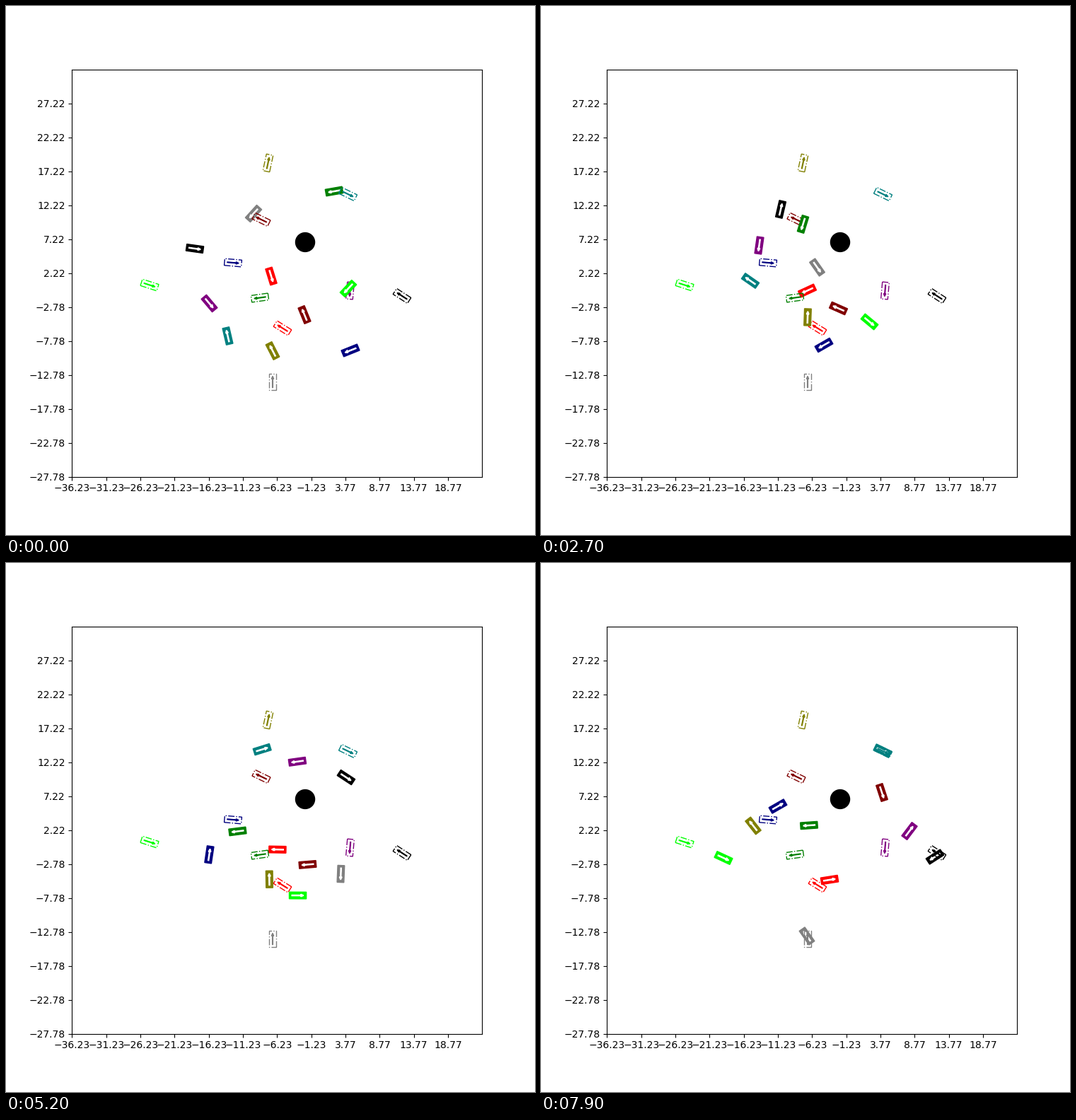
Animation of 748 by 748 pixels, one loop 8 s. Source, as a matplotlib script:

```python
import numpy as np
import matplotlib.pyplot as plt
from matplotlib.animation import FuncAnimation
from matplotlib.patches import Circle, FancyArrow, Rectangle
from matplotlib.transforms import Affine2D

SIZE, DPI = 748, 100
FRAMES, INTERVAL = 80, 100
X0, Y0, SPAN = -36.23, -27.78, 60
LENGTH, WIDTH = 2.5, 1.0
LEFT, RIGHT, BOTTOM, TOP = 0.1249, 0.9, 0.11, 0.88
STEPS = [0, 26, 43, 58, 78]

fig, ax = plt.subplots(figsize=(SIZE / DPI, SIZE / DPI), dpi=DPI)
fig.subplots_adjust(LEFT, BOTTOM, RIGHT, TOP)
ax.set_xlim(X0, X0 + SPAN)
ax.set_ylim(Y0, Y0 + SPAN)
ax.set_xticks(np.arange(X0, X0 + SPAN - 1, 5))
ax.set_yticks(np.arange(Y0, Y0 + SPAN - 1, 5))


def to_data(x, y):
    """Stage pixels (y down) to axes units."""
    return (X0 + (x / SIZE - LEFT) / (RIGHT - LEFT) * SPAN,
            Y0 + (1 - y / SIZE - BOTTOM) / (TOP - BOTTOM) * SPAN)


def place(parts, x, y, heading):
    move = Affine2D().rotate_deg(heading).translate(*to_data(x, y))
    for part in parts:
        part.set_transform(move + ax.transData)


def body(z, **style):
    box = Rectangle((-LENGTH / 2, -WIDTH / 2), LENGTH, WIDTH,
                    lw=1, zorder=z, **style)
    return ax.add_patch(box)


def arrow(color, z, lw):
    shape = FancyArrow(-0.85, 0, 1.7, 0, width=0.08, head_width=0.34,
                       head_length=0.4, length_includes_head=True,
                       color=color, lw=lw, zorder=z)
    return ax.add_patch(shape)


def ahead(heading):
    a = np.radians(heading)
    return np.array([np.cos(a), -np.sin(a)])


def arc(start, end, u):
    """Drive, forwards or in reverse, along a near-circular arc."""
    p, q = np.array(start[:2]), np.array(end[:2])
    h0, h1 = start[2], end[2]
    chord = q - p
    gear = 1 if chord @ ahead((h0 + h1) / 2) >= 0 else -1
    pull = gear * np.hypot(*chord) / np.cos(np.radians(h1 - h0) / 4) ** 2
    x, y = (p + chord * u * u * (3 - 2 * u)
            + pull * u * (1 - u) * (ahead(h0) * (1 - u) - ahead(h1) * u))
    return x, y, h0 + (h1 - h0) * u


class Car:
    """Drives through a few poses (x, y, heading) towards a marked goal."""

    def __init__(self, z, color, goal, *poses):
        self.poses = poses
        self.parts = [body(z, color=color), arrow("white", z + 0.1, 1.3)]
        place([body(z + 0.2, fill=False, ec=color, ls="-."),
               arrow(color, z + 0.3, 1)], *goal)

    def drive(self, step):
        i = min(np.searchsorted(STEPS, step, side="right"), len(STEPS) - 1)
        u = (step - STEPS[i - 1]) / (STEPS[i] - STEPS[i - 1])
        if i == 1:
            u **= 1.5  # pull away from rest
        place(self.parts, *arc(self.poses[i - 1], self.poses[i], u))


ax.add_patch(Circle(to_data(423, 334), 1.4, color="black", lw=1, zorder=1))

cars = [
    Car(3, "black", (560, 410, 147), (267, 343, -8), (339, 287.5, 77),
        (440, 277, -11), (508.5, 339, -53), (557, 415.5, -147)),
    Car(4, "gray", (377, 531.5, 90), (350, 293.5, 228), (390.5, 369.5, 305),
        (461, 401.5, 320), (454, 473, 222), (376, 527.5, 125)),
    Car(5, "maroon", (361, 302, 154), (422, 436.5, 112), (420.5, 427.5, 156),
        (410.5, 424.5, 156), (440, 421.5, 210), (482, 324.5, 288)),
    Car(6, "red", (391, 455.5, 148), (375, 382, 287), (376.5, 402.5, 205),
        (370, 405, 180), (396, 405.5, 178), (408, 448, 9)),
    Car(7, "purple", (486.5, 402.5, 265), (287.5, 420.5, 310),
        (308.5, 338.5, 262), (384, 308, 228), (440, 277.5, 153),
        (521, 379, 53)),
    Car(8, "green", (359, 412.5, 188), (464, 262, 190), (370.5, 308.5, 253),
        (326.5, 377.5, 215), (328.5, 382, 163), (379, 371, 184)),
    Car(9, "lime", (203, 394.5, -18), (484, 399.5, 227), (464.5, 446.5, 320),
        (450, 446, 372), (379.5, 482.5, 349), (258, 417, 335)),
    Car(10, "olive", (370.5, 222, 78), (377, 487.5, 117), (377, 440, 88),
        (372, 456, 77), (371, 439.5, 103), (300, 371.5, 128)),
    Car(11, "navy", (321, 363, -5), (487, 487, 202), (400, 479.5, 210),
        (319, 453.5, 112), (281, 378.5, 55), (335, 344, 30)),
    Car(12, "teal", (483.5, 266, -26), (313.5, 466.5, 103),
        (296, 388.5, 145), (342, 314.5, 52), (388.5, 242.5, -13),
        (483, 265.5, -26)),
]


def draw(frame):
    for car in cars:
        car.drive(max(0, frame - 1))
    return [part for car in cars for part in car.parts]


anim = FuncAnimation(fig, draw, frames=FRAMES, interval=INTERVAL,
                     init_func=lambda: draw(0), repeat=True, repeat_delay=0)
plt.show()
```
